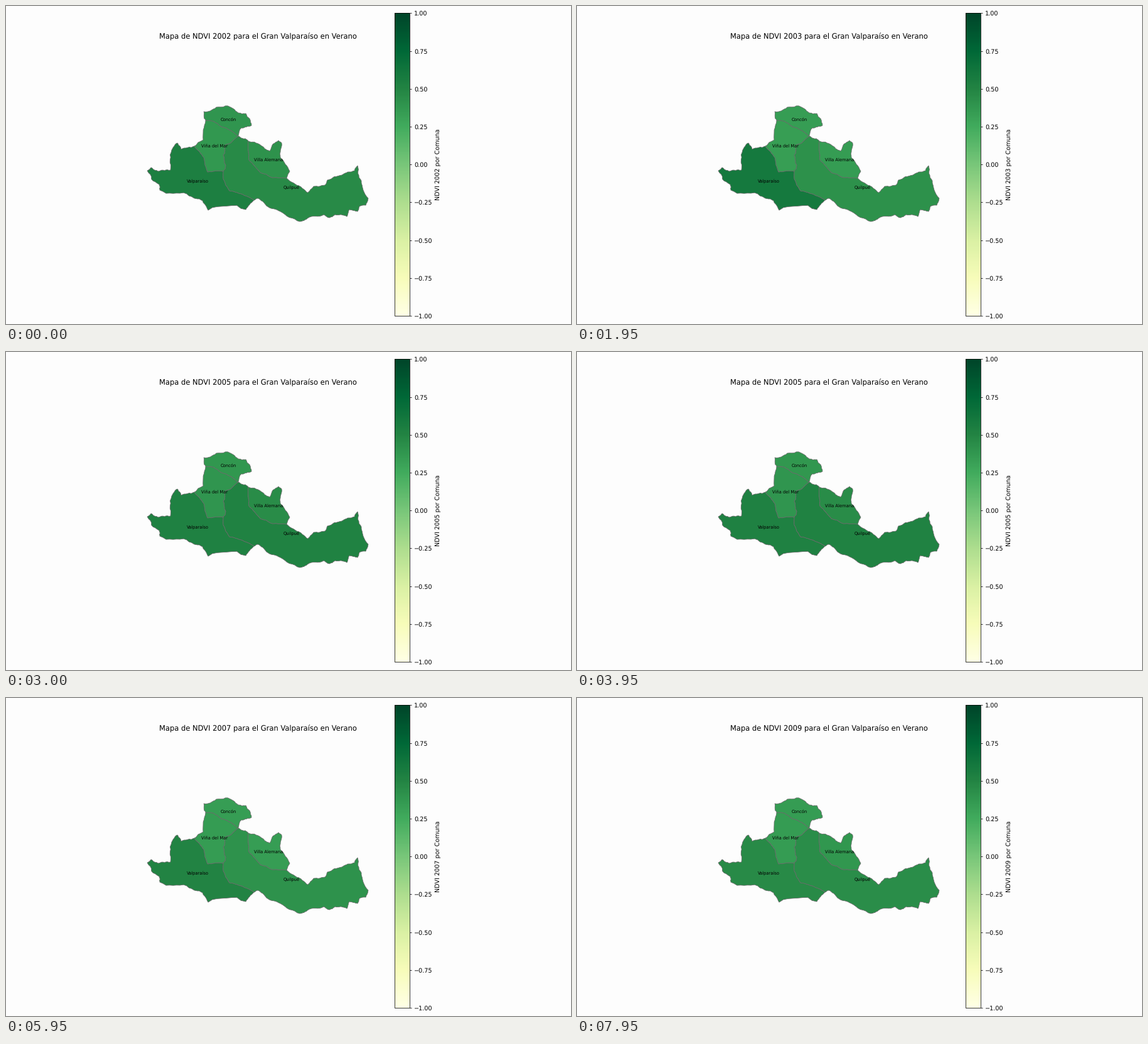
A matplotlib script for the animation above (8000 ms loop, 900 by 506 pixels).

```python
import numpy as np
import matplotlib.pyplot as plt
from matplotlib.animation import FuncAnimation
from matplotlib.cm import ScalarMappable
from matplotlib.colors import Normalize
from matplotlib.patches import Polygon

W, H = 900, 506
DPI = W / 13
STEP, YEAR_MS, FIRST_YEAR, YEARS = 50, 1000, 2002, 8

plt.rcParams.update({"font.family": "DejaVu Sans", "text.hinting": "none"})
cmap, norm = plt.get_cmap("YlGn"), Normalize(-1, 1)
rng = np.random.default_rng(7)

# Corners where borders meet
COAST_W, COAST_N = (300, 223), (318, 182)
NORTH, CENTRE, SOUTH = (370, 207), (346, 263), (395, 309)
VILLA_W, VILLA_E = (386, 215), (447, 274)


def border(*pts, rounds=3, rough=0.13):
    """Polyline through a few points, roughened by midpoint displacement."""
    pts = np.array(pts, float)
    for _ in range(rounds):
        step = np.diff(pts, axis=0)
        normal = np.c_[-step[:, 1], step[:, 0]]
        out = np.empty((2 * len(pts) - 1, 2))
        out[::2] = pts
        out[1::2] = pts[:-1] + step / 2 + normal * rng.uniform(-rough, rough, (len(step), 1))
        pts = out
    return pts


def ring(*arcs):
    return np.vstack(arcs)


valpo_coast = border(
    SOUTH, (382, 324), (322, 325), (308, 307), (288, 299), (245, 293), (244, 284),
    (225, 262), (231, 257), (243, 263), (262, 261), (264, 229), (273, 218),
    (279, 228), COAST_W)
vina_coast = border(COAST_W, (314, 213), COAST_N, rough=0.08)
concon_coast = border(
    COAST_N, (315, 168), (335, 161), (363, 164), (370, 170), (382, 171), (391, 190),
    (375, 194), NORTH)
concon_vina = border(COAST_N, (330, 183), (358, 198), NORTH, rough=0.06)
vina_quilpue = border(NORTH, (349, 221), (346, 238), (350, 254), CENTRE)
vina_valpo = border(CENTRE, (321, 264), (315, 241), COAST_W, rough=0.06)
valpo_quilpue = border(CENTRE, (346, 275), (356, 294), (375, 299), SOUTH, rough=0.06)
quilpue_north = border(NORTH, (381, 211), VILLA_W)
villa_quilpue = border(
    VILLA_W, (387, 245), (405, 265), (424, 273), VILLA_E, rough=0.06)
villa_edge = border(
    VILLA_W, (405, 221), (420, 231), (425, 220), (434, 214), (439, 218), (437, 241),
    (452, 263), VILLA_E, rough=0.08)
quilpue_edge = border(
    VILLA_E, (470, 288), (481, 297), (490, 287), (508, 285), (512, 277), (535, 269),
    (555, 262), (560, 254), (566, 278), (577, 306), (573, 317), (563, 319),
    (560, 327), (547, 324), (543, 335), (524, 332), (515, 337), (506, 332),
    (480, 338), (468, 343), (437, 327), (415, 318), (401, 306), SOUTH, rough=0.1)

# Name, outline, label position, mean NDVI for each year
COMUNAS = [
    ("Valparaíso", ring(valpo_coast, vina_valpo[::-1], valpo_quilpue),
     (305, 282), (.54, .60, .55, .53, .53, .50, .53, .46)),
    ("Quilpué", ring(quilpue_north, villa_quilpue, quilpue_edge,
                     valpo_quilpue[::-1], vina_quilpue[::-1]),
     (454.5, 291.5), (.46, .42, .47, .52, .51, .41, .46, .44)),
    ("Villa Alemana", ring(villa_edge, villa_quilpue[::-1]),
     (418, 247), (.41, .35, .40, .45, .44, .34, .44, .38)),
    ("Viña del Mar", ring(vina_coast, concon_vina, vina_quilpue, vina_valpo),
     (332.5, 225), (.37, .33, .37, .39, .39, .35, .41, .35)),
    ("Concón", ring(concon_coast, concon_vina[::-1]),
     (354.5, 182.5), (.39, .34, .37, .38, .38, .34, .39, .35)),
]

fig = plt.figure(figsize=((W + 1e-4) / DPI, (H + 1e-4) / DPI), dpi=DPI,
                 facecolor="#fdfdfd")
ax = fig.add_axes([0, 0, 1, 1])
ax.set(xlim=(0, W), ylim=(H, 0))
ax.axis("off")

shapes = []
for name, outline, (x, y), _ in COMUNAS:
    shapes.append(ax.add_patch(Polygon(outline, ec="dimgray", lw=0.8)))
    ax.text(x, y, name, size=7, ha="center", zorder=5)
title = ax.text(401, 52.8, "", size=12, ha="center")

cax = fig.add_axes([619.3 / W, 1 - 493 / H, 24.1 / W, 481.6 / H])
bar = fig.colorbar(ScalarMappable(norm, cmap), cax=cax)


def draw(frame):
    i = frame * STEP // YEAR_MS
    year = FIRST_YEAR + i
    title.set_text(f"Mapa de NDVI {year} para el Gran Valparaíso en Verano")
    bar.set_label(f"NDVI {year} por Comuna")
    for shape, (*_, ndvi) in zip(shapes, COMUNAS):
        shape.set_facecolor(cmap(norm(ndvi[i])))
    return [title, *shapes]


anim = FuncAnimation(fig, draw, frames=YEARS * YEAR_MS // STEP, interval=STEP,
                     init_func=lambda: draw(0), repeat=True, repeat_delay=0)
plt.show()
```
